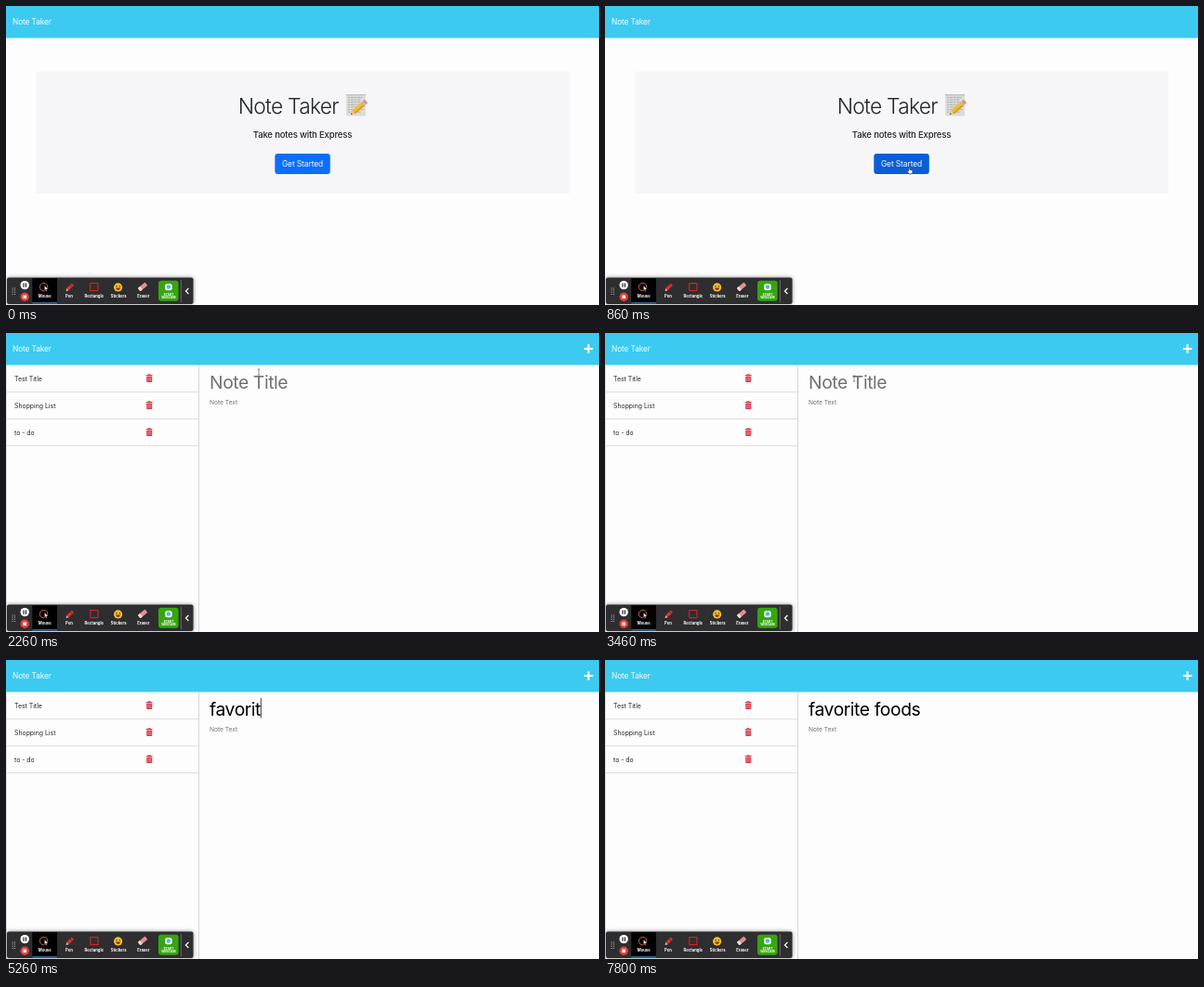
Animation of 638x322 px, one loop 8 s. Source, as an HTML page with a canvas:

```html
<!DOCTYPE html>
<html lang="en">
<head>
<meta charset="utf-8">
<title>Note Taker</title>
<style>
  html, body { margin: 0; width: 100%; height: 100%; overflow: hidden; background: #fdfdfd; }
  canvas { display: block; width: 638px; height: 322px; }
</style>
</head>
<body>
<canvas id="stage"></canvas>
<script>
const W = 638, H = 322, LOOP = 8000;
const PAGE_OPEN = 1060, LIST_LOADED = 1130;
const canvas = document.getElementById('stage');
const ctx = canvas.getContext('2d');
const dpr = window.devicePixelRatio || 1;
canvas.width = W * dpr;
canvas.height = H * dpr;

const NOTE = 'favorite foods';
const KEY_TIMES = [4660, 4730, 4860, 5000, 5130, 5200, 5260, 5330, 5400, 5460, 5600, 5660, 5730, 5800];

// time, x, y
const POINTER = [
  [60, 438, 326], [450, 372, 226], [800, 328, 177], [1860, 328, 177],
  [2260, 272, 42], [2660, 268, 49], [3460, 268, 49], [3800, 257, 51],
  [6730, 257, 51], [7200, 240, 75]
];

function rect(x, y, w, h, color, r = 0) {
  ctx.fillStyle = color;
  ctx.beginPath();
  ctx.roundRect(x, y, w, h, r);
  ctx.fill();
}

function disc(x, y, r, color) {
  ctx.fillStyle = color;
  ctx.beginPath();
  ctx.arc(x, y, r, 0, Math.PI * 2);
  ctx.fill();
}

function line(points, color, width = 1) {
  ctx.strokeStyle = color;
  ctx.lineWidth = width;
  ctx.beginPath();
  points.forEach(([x, y]) => ctx.lineTo(x, y));
  ctx.stroke();
}

function poly(points, fill, stroke, width = 0.7) {
  ctx.beginPath();
  points.forEach(([x, y]) => ctx.lineTo(x, y));
  ctx.closePath();
  ctx.fillStyle = fill;
  ctx.fill();
  if (stroke) {
    ctx.strokeStyle = stroke;
    ctx.lineWidth = width;
    ctx.stroke();
  }
}

function text(str, x, y, size, color, { weight = 400, align = 'left', track = 0 } = {}) {
  ctx.font = `${weight} ${size}px Inter, sans-serif`;
  ctx.letterSpacing = track + 'px';
  ctx.textAlign = align;
  ctx.fillStyle = color;
  ctx.fillText(str, x, y);
  return ctx.measureText(str).width;
}

function at(x, y, angle, draw) {
  ctx.save();
  ctx.translate(x, y);
  ctx.rotate(angle);
  draw();
  ctx.restore();
}

function pointerAt(t) {
  const i = POINTER.findIndex(p => p[0] > t);
  if (i === 0) return POINTER[0].slice(1);
  if (i < 0) return POINTER[POINTER.length - 1].slice(1);
  const [t0, x0, y0] = POINTER[i - 1], [t1, x1, y1] = POINTER[i];
  const u = (t - t0) / (t1 - t0), k = u * u * (3 - 2 * u);
  return [x0 + (x1 - x0) * k, y0 + (y1 - y0) * k];
}

function header() {
  rect(0, 0, W, 34.6, '#3dcaf0');
  text('Note Taker', 7, 20.4, 8.3, '#f8fdff', { track: -0.1 });
}

function memo() {
  rect(366, 95, 21, 23.5, '#dcdcda', 1);
  rect(366, 95, 21, 1.5, '#c3c3c0');
  for (let y = 98.5; y < 116; y += 2.6) {
    ctx.setLineDash([2.2, 0.8, 3.4, 0.7]);
    line([[368, y], [385 - (y * 7) % 4, y]], '#9a9a9a', 0.7);
  }
  ctx.setLineDash([]);
  at(371, 117, -0.72, () => {
    poly([[0, 0], [4, -2.5], [4, 2.5]], '#e8c998');
    poly([[0, 0], [1.6, -1], [1.6, 1]], '#444');
    rect(4, -2.5, 14, 5, '#f4bd24');
    rect(4, 0.8, 14, 1.7, '#d99a17');
    rect(17, -2.5, 2, 5, '#b8bcc0');
    rect(19, -2.5, 3, 5, '#e58a86', 1);
  });
}

function home(hover) {
  rect(32.5, 70.5, 573.5, 131.5, '#f6f6f9');
  text('Note Taker', 303.7, 115.6, 22.8, '#212529', { weight: 300, align: 'center', track: -0.75 });
  memo();
  text('Take notes with Express', 319, 142.3, 9.6, '#212529', { weight: 500, align: 'center', track: -0.2 });
  rect(289.3, 159, 59.5, 22, hover ? '#0b5ed7' : '#0d6efd', 3);
  text('Get Started', 319, 173, 8.3, '#fff', { align: 'center', track: -0.05 });
}

function trash(x, y) {
  const red = '#d63a49';
  rect(x - 3.5, y - 3.8, 7, 1.2, red, 0.4);
  rect(x - 1.3, y - 4.5, 2.6, 1, red, 0.4);
  rect(x - 3, y - 2.3, 6, 6.6, red, 0.8);
  for (const dx of [-1.5, 0, 1.5]) line([[x + dx, y - 1.2], [x + dx, y + 3.2]], '#f3b4ba', 0.5);
}

function notes(t) {
  line([[207.5, 35], [207.5, H]], '#d6d6d6');
  line([[0.5, 35], [0.5, H]], '#e2e2e2');
  line([[626.7, 12.2], [626.7, 21.8]], '#fff', 2.1);
  line([[621.9, 17], [631.5, 17]], '#fff', 2.1);

  if (t >= LIST_LOADED) {
    ['Test Title', 'Shopping List', 'to - do'].forEach((title, i) => {
      const y = 49 + i * 29;
      text(title, 9, y + 2.5, 6.9, '#212529');
      trash(154.2, y - 0.3);
      line([[0, y + 14.5], [207, y + 14.5]], '#dfdfdf');
    });
  }

  const typed = NOTE.slice(0, KEY_TIMES.filter(k => k <= t).length);
  const style = { track: -0.4 };
  const width = text(typed || 'Note Title', 219, 59.6, 19.3, typed ? '#000' : '#707070', style);
  text('Note Text', 219, 77.3, 6.6, '#707070');

  const titleCaret = (t >= 3530 && t < 4060) || (t >= 4600 && t < 6200);
  if (titleCaret) {
    const x = 219.3 + (typed ? width : 0);
    line([[x, 41], [x, 62.5]], '#111', 0.8);
  }
  if (t >= 7200 && t < 7730) line([[219.2, 71], [219.2, 79]], '#111', 0.6);
}

function toolbar() {
  ctx.save();
  ctx.shadowColor = 'rgba(0,0,0,.45)';
  ctx.shadowBlur = 4 * dpr;
  rect(1, 292.5, 200.5, 28.5, '#2e2e30', 2);
  ctx.restore();
  for (let i = 0; i < 8; i++) rect(6.6 + (i % 2) * 2.3, 303.4 + (i >> 1) * 2.2, 1, 1, '#bdbdbd');

  disc(20.2, 300.6, 4.7, '#fff');
  rect(18.4, 298.5, 1.2, 4.2, '#222');
  rect(20.8, 298.5, 1.2, 4.2, '#222');
  disc(20.2, 313.2, 4.7, '#e9403f');
  rect(18.4, 311.4, 3.6, 3.6, '#fff', 0.4);

  rect(28.3, 293.2, 26.7, 27.3, '#000');
  rect(28.3, 319.3, 26.7, 1.2, '#3f8fd2');
  ctx.strokeStyle = '#e5574f';
  ctx.lineWidth = 1;
  ctx.beginPath();
  ctx.arc(40.6, 302.6, 4.2, 0, Math.PI * 2);
  ctx.stroke();
  arrow(41.3, 300.8, 0.65, '#fff', '#000');

  at(64.6, 306.9, -0.78, () => {
    poly([[0, 0], [2.5, -1.6], [2.5, 1.6]], '#f3c7b0');
    rect(2.5, -1.7, 5.3, 3.4, '#e62e2e');
    rect(8.2, -1.7, 2, 3.4, '#e62e2e', 0.6);
  });
  ctx.strokeStyle = '#d92323';
  ctx.lineWidth = 1.1;
  ctx.strokeRect(90.7, 298.6, 8.2, 8);

  disc(120.6, 302.9, 4.6, '#f6bd2c');
  disc(119, 301.7, 0.75, '#503515');
  disc(122.3, 301.7, 0.75, '#503515');
  ctx.fillStyle = '#7d3518';
  ctx.beginPath();
  ctx.arc(120.6, 303.5, 2.4, 0, Math.PI);
  ctx.fill();

  at(147, 302.4, -0.7, () => {
    rect(-5, -2.2, 10, 4.4, '#e58d96', 0.8);
    rect(-5, -2.2, 3, 4.4, '#f2d8d8', 0.8);
  });

  [['Mouse', 41.7], ['Pen', 68], ['Rectangle', 94.8], ['Stickers', 121.2], ['Eraser', 147.8]]
    .forEach(([label, x]) => text(label, x, 313.9, 4.2, '#fff', { weight: 700, align: 'center' }));

  rect(164, 295.8, 21.6, 22, '#36a60f', 3);
  rect(171.2, 299.3, 7.4, 7, '#fff', 2);
  disc(174.9, 302.5, 2.3, '#54b7dd');
  text('START', 174.9, 311.6, 3.3, '#fff', { weight: 700, align: 'center' });
  text('WEBCAM', 174.9, 315.1, 3.3, '#fff', { weight: 700, align: 'center' });
  line([[188.3, 295], [188.3, 319]], '#8a8a8a', 0.7);
  line([[196.4, 304], [193.4, 307], [196.4, 310]], '#fff', 1.2);
}

function arrow(x, y, s, fill, edge) {
  const shape = [[0, 0], [0, 9], [2, 7.2], [3.4, 10.2], [4.8, 9.6], [3.5, 6.7], [6.3, 6.5]];
  poly(shape.map(([dx, dy]) => [x + dx * s, y + dy * s]), fill, edge, 0.6);
}

function hand(x, y) {
  const shape = [[-1.2, -3.2], [-0.2, -3.2], [0, -0.8], [2.8, -0.2], [3, 1.8], [2, 3.8], [-1, 3.8], [-3, 1], [-2.4, 0.3], [-1.2, 1]];
  poly(shape.map(([dx, dy]) => [x + dx, y + dy]), '#fff', '#222', 0.6);
}

function ibeam(x, y) {
  const color = '#444';
  line([[x, y - 2.8], [x, y + 2.8]], color, 0.6);
  for (const dy of [-3, 3]) line([[x - 1.3, y + dy], [x + 1.3, y + dy]], color, 0.6);
}

function render(t) {
  ctx.setTransform(dpr, 0, 0, dpr, 0, 0);
  rect(0, 0, W, H, '#fdfdfd');
  header();
  const [x, y] = pointerAt(t);
  const onHome = t < PAGE_OPEN;
  const hover = onHome && x > 289 && x < 349 && y > 159 && y < 181;
  if (onHome) home(hover);
  else notes(t);
  toolbar();

  if (hover) hand(x, y);
  else if (onHome) arrow(x, y, 0.75, '#111', '#fff');
  else if (t < 4600 || (t > 6790 && t < 7200)) ibeam(x, y);
}

function tick() {
  render(performance.now() % LOOP);
  requestAnimationFrame(tick);
}
tick();
</script>
</body>
</html>
```
